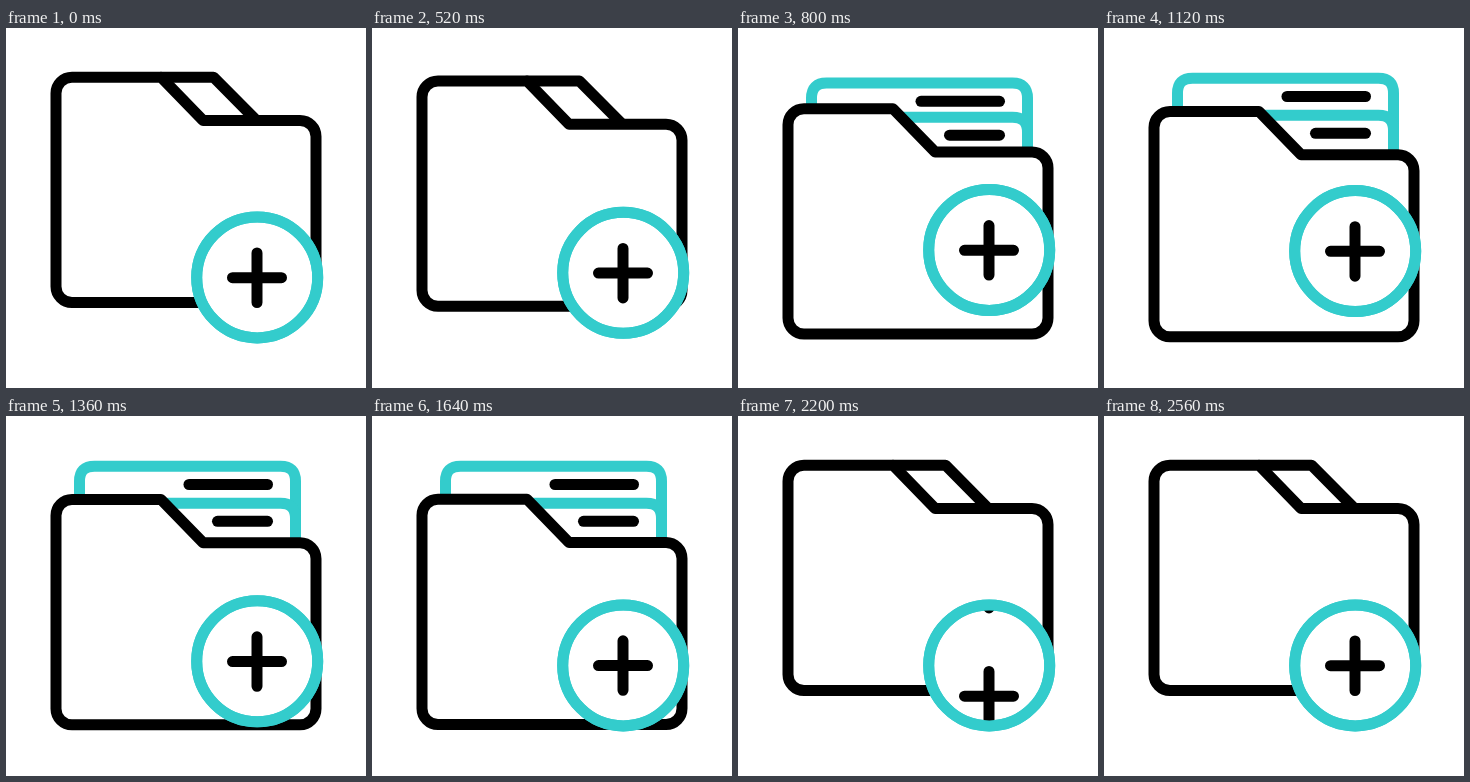
Recreate the animation shown at these times as an HTML page. Size 360 px wide and 360 px high, loop 3 s.

```html
<!DOCTYPE html>
<html lang="en">
<head>
<meta charset="utf-8">
<title>Add to folder</title>
<style>
html, body { margin: 0; width: 100%; height: 100%; overflow: hidden; background: #fff; }
svg { display: block; width: 100vw; height: 100vh; }
path, circle { fill: #fff; stroke: #000; stroke-width: 11; stroke-linecap: round; stroke-linejoin: round; }
.teal { stroke: #33cccc; }
.line { fill: none; }
</style>
</head>
<body>
<svg viewBox="0 0 360 360">
  <defs>
    <path id="sheet" class="teal" d="M73.5 130V15Q73.5 0 88.5 0H274.5Q289.5 0 289.5 15V130"/>
    <path id="plus" class="line" d="M226.5 249.7H275.5M251 225V274.5"/>
    <clipPath id="disc"><circle cx="251.2" cy="249.4" r="56"/></clipPath>
  </defs>
  <path id="flap" class="line" d="M155 49.2H207.5L249 91"/>
  <g id="sheet1"><use href="#sheet"/><path class="line" d="M183 18.3H261.5"/></g>
  <g id="sheet2"><use href="#sheet"/><path class="line" d="M211.5 18H261.5"/></g>
  <path id="front" d="M66 49.2H155L197 92.4H294A16 16 0 0 1 310 108.4V258.5A16 16 0 0 1 294 274.5H66A16 16 0 0 1 50 258.5V65.2A16 16 0 0 1 66 49.2Z"/>
  <g id="badge">
    <circle class="teal" cx="251.2" cy="249.4" r="60.5"/>
    <g clip-path="url(#disc)">
      <g id="roll"><use href="#plus"/><use href="#plus" y="113"/></g>
    </g>
    <circle class="teal line" cx="251.2" cy="249.4" r="60.5"/>
  </g>
</svg>
<script>
const LOOP = 3000, STEP = 40;
const progress = (t, start, length) => Math.min(1, Math.max(0, (t - start) / length));
const cubic = u => u < .5 ? 4 * u ** 3 : 1 - 4 * (1 - u) ** 3;
const smooth = u => u * u * (3 - 2 * u);
const ease = (t, start, length) => cubic(progress(t, start, length));
const shift = (id, y) => document.getElementById(id).setAttribute('transform', `translate(0 ${y})`);

function draw(t) {
  const rise = ease(t, 320, 660);
  const drop = 34.3 * (rise - ease(t, 1562, 660));
  const pull = rise - ease(t, 1728, 660);
  shift('front', drop);
  shift('flap', drop);
  shift('sheet1', 110 - 59.8 * pull);
  shift('sheet2', 110 - 22.7 * pull);
  shift('badge', -28 * (ease(t, 320, 580) - ease(t, 980, 570)));
  shift('roll', -113 * smooth(progress(t, 1620, 880)));
}

function tick() {
  draw(Math.floor(performance.now() % LOOP / STEP) * STEP);
  requestAnimationFrame(tick);
}
tick();
</script>
</body>
</html>
```
